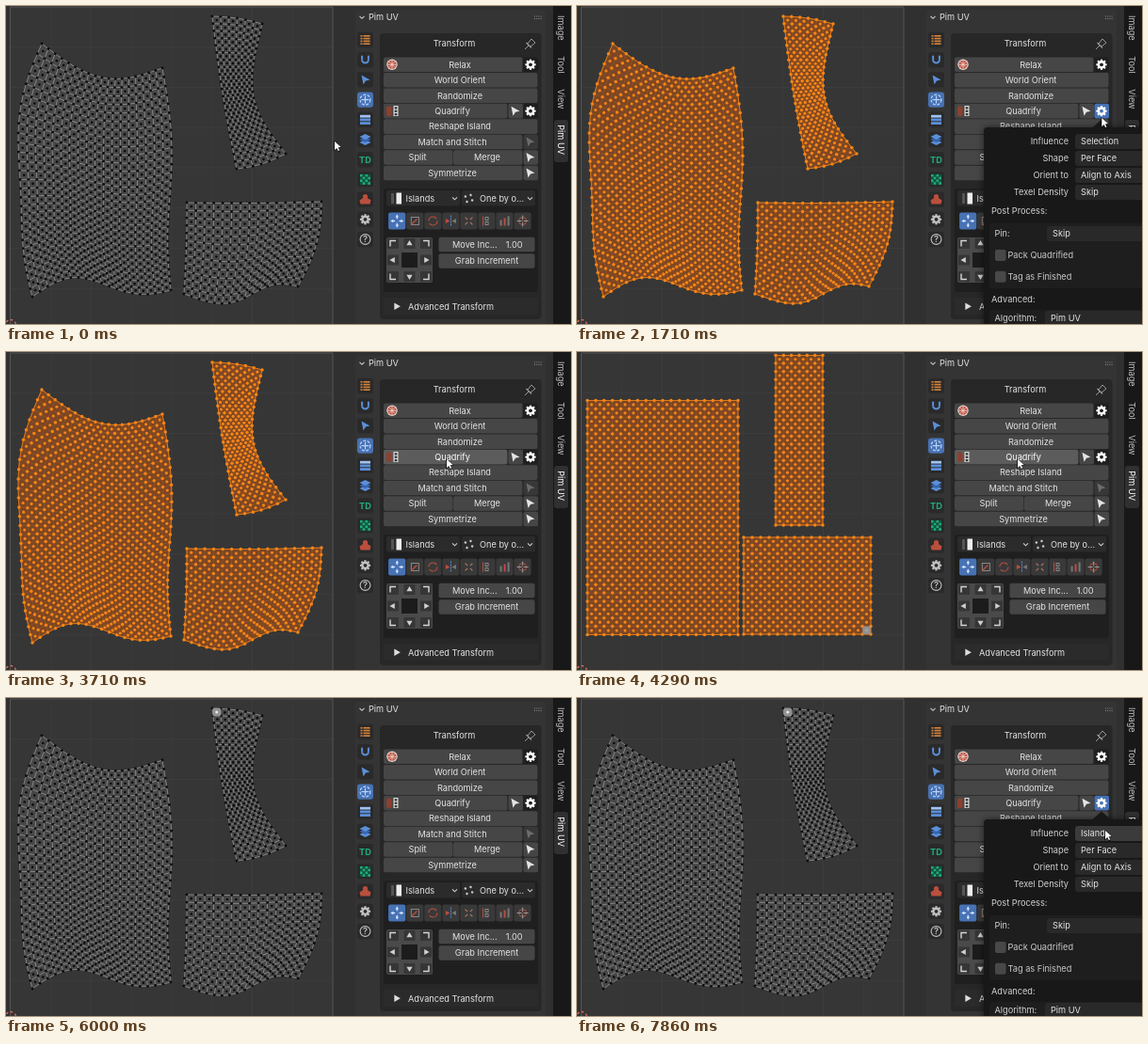
Recreate the animation shown at these times as an HTML page with a canvas. Size 600x338 px, loop 8 s.

```html
<!DOCTYPE html>
<html lang="en">
<head>
<meta charset="utf-8">
<title>UV transform panel</title>
<style>
html, body { margin: 0; width: 100%; height: 100%; overflow: hidden; background: #303030; }
canvas { display: block; width: 600px; height: 338px; }
</style>
</head>
<body>
<canvas id="stage" width="600" height="338"></canvas>
<script>
const ctx = document.getElementById('stage').getContext('2d');
const LOOP = 8000, STEP = 1000 / 7;
const NAME = 'Pim UV';
const BLUE = '#4772b3', ICON_BLUE = '#5b8fd9', TEXT = '#e4e4e4', LABEL = '#d2d2d2';
const ORANGE = '#d9853b', GREEN = '#1fae7c', RED = '#bb4f3e', GREY = '#c0c0c0', DARK = '#1f1f1f';

// ---------- drawing helpers ----------
const times = (n, fn) => Array.from({ length: n }, (_, i) => fn(i));

function box(x, y, w, h, color, radius = 2) {
  ctx.fillStyle = color;
  ctx.beginPath();
  ctx.roundRect(x, y, w, h, radius);
  ctx.fill();
}

function trace(points, closed) {
  ctx.beginPath();
  points.forEach(([x, y]) => ctx.lineTo(x, y));
  if (closed) ctx.closePath();
}

function poly(points, color) {
  trace(points, true);
  ctx.fillStyle = color;
  ctx.fill();
}

function line(points, color, width = 1) {
  trace(points);
  ctx.strokeStyle = color;
  ctx.lineWidth = width;
  ctx.stroke();
}

function disc(x, y, r, color) {
  ctx.fillStyle = color;
  ctx.beginPath();
  ctx.arc(x, y, r, 0, 7);
  ctx.fill();
}

function ring(x, y, r, color, width = 1, sweep = Math.PI * 2) {
  ctx.strokeStyle = color;
  ctx.lineWidth = width;
  ctx.beginPath();
  ctx.arc(x, y, r, 0, sweep);
  ctx.stroke();
}

function frame(x, y, size, color) {
  ctx.strokeStyle = color;
  ctx.lineWidth = 1;
  ctx.strokeRect(x - size / 2, y - size / 2, size, size);
}

function dashed(draw, ...dash) {
  ctx.setLineDash(dash);
  draw();
  ctx.setLineDash([]);
}

function text(str, x, y, align = 'left', color = TEXT, weight = 400) {
  ctx.font = `${weight} 9.2px Inter, sans-serif`;
  ctx.textAlign = align;
  ctx.fillStyle = color;
  ctx.fillText(str, x, y + 3.3);
}

// Lines radiating from a centre.
function spokes(x, y, count, inner, outer, color, width = 1, turn = 0) {
  times(count, i => {
    const a = turn + i * 2 * Math.PI / count, c = Math.cos(a), s = Math.sin(a);
    line([[x + c * inner, y + s * inner], [x + c * outer, y + s * outer]], color, width);
  });
}

function triangle(x, y, r, angle, color) {
  poly(times(3, i => {
    const a = angle + i * 2 * Math.PI / 3;
    return [x + Math.cos(a) * r, y + Math.sin(a) * r];
  }), color);
}

function mouse(x, y, color, s = 1) {
  poly([[0, 0], [7, 6.4], [3.8, 6.7], [5.4, 10], [4, 10.6], [2.4, 7.4], [0, 9.6]]
    .map(([px, py]) => [x + px * s, y + py * s]), color);
}

function pointer(x, y, color) {
  poly([[x - 4, y - 5], [x + 5, y], [x + 0.5, y + 1], [x - 2, y + 5]], color);
}

function gear(x, y, color, hole) {
  spokes(x, y, 8, 3, 5.6, color, 2.2);
  disc(x, y, 4.3, color);
  disc(x, y, 1.9, hole);
}

function chevron(x, y) {
  line([[x - 2.5, y - 1.2], [x, y + 1.3], [x + 2.5, y - 1.2]], '#d0d0d0', 1.1);
}

// ---------- UV islands ----------
// Corners run top-left, top-right, bottom-left, bottom-right;
// each side bends by a sum of sines with the listed amplitudes.
const islands = [
  { cols: 18, rows: 28, rect: [11, 51.5, 160, 249], sag: 10,
    corners: [[38, 40], [166, 66], [28, 309], [175, 302]],
    top: [23], bottom: [-11, -10], left: [-21, -4, -3], right: [4, 4] },
  { cols: 6, rows: 21, rect: [211, 3.5, 50, 180.5], sag: 0,
    corners: [[219, 11], [272, 19], [245, 173], [297, 157]],
    top: [-2], bottom: [3], left: [-2], right: [-23, 2] },
  { cols: 15, rows: 12, rect: [177, 197, 135, 103], sag: 0,
    corners: [[192, 209], [335, 208], [189, 306], [310, 298]],
    top: [1], bottom: [8, 7, -2], left: [1], right: [7] }
];

const mix = (a, b, t) => a + (b - a) * t;
const wave = (amps, t) => amps.reduce((sum, a, n) => sum + a * Math.sin((n + 1) * Math.PI * t), 0);

function warped({ corners: [tl, tr, bl, br], top, bottom, left, right, sag }, u, v) {
  const [x, y] = [0, 1].map(k => mix(mix(tl[k], tr[k], u), mix(bl[k], br[k], u), v));
  return [
    x + mix(wave(left, v), wave(right, v), u),
    y + mix(wave(top, u), wave(bottom, u), v) + wave([sag], v)
  ];
}

function straight({ rect: [x, y, w, h] }, u, v) {
  return [x + u * w, y + v * h];
}

function drawIsland(island, place, selected, activeCell) {
  const { cols, rows } = island;
  const at = (i, j) => place(island, i / cols, j / rows);
  const mesh = times(rows + 1, j => times(cols + 1, i => at(i, j)));
  const columns = times(cols + 1, i => mesh.map(row => row[i]));
  const outline = [...mesh[0], ...columns[cols], ...mesh[rows].toReversed(), ...columns[0].toReversed()];
  poly(outline, selected ? '#7c4624' : '#474747');
  for (const path of [...mesh, ...columns]) line(path, selected ? '#8f5122' : '#8e8e8e', 0.9);
  if (selected) line(outline, '#e87d16', 0.9);

  const [color, r] = selected ? ['#f58518', 1.75] : ['#0c0c0c', 1.45];
  mesh.flat().forEach(([x, y]) => disc(x, y, r, color));
  times(rows, j => times(cols, i => disc(...at(i + 0.5, j + 0.5), r * 0.9, color)));
  if (activeCell) {
    const [x, y] = at(activeCell[0] + 0.5, activeCell[1] + 0.5);
    box(x - 4.2, y - 4.2, 8.4, 8.4, '#929292', 1);
    disc(x, y, 1.5, selected ? '#b5a08c' : '#e8e8e8');
  }
}

function drawEditor(state) {
  box(0, 0, 600, 338, '#303030', 0);
  box(5, 1, 342, 337, '#363636', 0);
  for (let p = 42.75; p < 340; p += 42.75) {
    line([[5 + p, 1], [5 + p, 338]], '#3e3e3e', 0.8);
    line([[5, 1 + p], [347, 1 + p]], '#3e3e3e', 0.8);
  }
  line([[4.5, 338], [4.5, 1], [347, 1], [347, 338]], '#555');
  islands.forEach((island, n) => {
    let cell = null;
    if (state.quad && n === 2) cell = [island.cols - 1, island.rows - 1];
    if (state.second && n === 1) cell = [0, 0];
    drawIsland(island, state.quad ? straight : warped, state.selected, cell);
  });
  dashed(() => ring(5, 339, 5.5, '#e07060', 1.3), 2.5, 2.5);
}

// ---------- sidebar ----------
function button(x, cy, w, label, state, labelX = x + w / 2) {
  const [mx, my] = state.cursor || [-1, -1];
  const hover = !state.popover && mx >= x && mx < x + w && Math.abs(my - cy) < 8;
  box(x, cy - 7.8, w, 15.6, hover && state.pressed ? BLUE : hover ? '#5c5c5c' : '#464646');
  text(label, labelX, cy, 'center', hover ? '#fff' : TEXT);
}

function drawTabs() {
  box(581, 0, 19, 338, '#181818', 0);
  box(582, 121, 15, 45, '#303030', 3);
  ctx.save();
  ctx.translate(589, 10);
  ctx.rotate(Math.PI / 2);
  let offset = 0;
  for (const label of ['Image', 'Tool', 'View', NAME]) {
    text(label, offset, 0, 'left', label === NAME ? '#fff' : GREY);
    offset += ctx.measureText(label).width + 16.6;
  }
  ctx.restore();
}

const categoryIcons = [
  (x, y) => times(4, i => {
    box(x - 5, y - 5 + i * 2.8, 2, 1.6, ORANGE, 0);
    box(x - 2, y - 5 + i * 2.8, 7, 1.6, ORANGE, 0);
  }),
  (x, y) => {
    ring(x, y, 3.4, ICON_BLUE, 2, Math.PI);
    for (const side of [-3.4, 3.4]) line([[x + side, y - 4.5], [x + side, y]], ICON_BLUE, 2);
  },
  (x, y) => pointer(x, y, ICON_BLUE),
  (x, y) => {
    dashed(() => ring(x, y, 5.4, '#b9d4ff', 1.2), 3, 1.5);
    spokes(x, y, 4, 0, 4, '#b9d4ff', 1.2);
  },
  (x, y) => times(3, i => box(x - 5.5, y - 5 + i * 3.7, 11, 2.8, i ? ICON_BLUE : '#9ec2f5', 0)),
  (x, y) => times(3, i => {
    const cy = y + 3 - i * 3;
    poly([[x, cy - 3], [x + 6, cy], [x, cy + 3], [x - 6, cy]], i === 1 ? '#3565ae' : ICON_BLUE);
  }),
  (x, y) => text('TD', x, y, 'center', GREEN, 700),
  (x, y) => times(16, i => {
    const col = i % 4, row = i >> 2;
    box(x - 5.5 + col * 2.75, y - 5.5 + row * 2.75, 2.75, 2.75, (col + row) % 2 ? '#0c5943' : GREEN, 0);
  }),
  (x, y) => {
    disc(x, y - 3, 2.6, RED);
    poly([[x, y - 3], [x + 6, y + 1], [x + 5, y + 5], [x - 5, y + 5], [x - 6, y + 1]], RED);
  },
  (x, y) => gear(x, y, GREY, '#2a2a2a'),
  (x, y) => {
    ring(x, y, 5.4, GREY, 1.1);
    text('?', x, y, 'center', GREY, 600);
  }
];

function drawCategories() {
  categoryIcons.forEach((icon, i) => {
    const y = 36 + i * 21.2;
    box(373, y - 8.2, 17, 16.4, i === 3 ? BLUE : '#2a2a2a', 3);
    icon(381.5, y);
  });
}

const toolIcons = [
  (x, y) => {
    spokes(x, y, 4, 2.2, 6, '#d8e6ff', 1.2);
    times(4, i => triangle(x + 5 * Math.cos(i * Math.PI / 2), y + 5 * Math.sin(i * Math.PI / 2), 2, i * Math.PI / 2, '#d8e6ff'));
  },
  (x, y) => { frame(x, y, 8, '#888'); line([[x - 4, y + 4], [x + 2, y - 2]], RED, 1.3); },
  (x, y) => dashed(() => ring(x, y, 4.5, RED, 1.2), 11, 3),
  (x, y) => {
    dashed(() => line([[x, y - 6], [x, y + 6]], ICON_BLUE), 2, 1);
    triangle(x - 4, y, 3, 0, RED);
    triangle(x + 4, y, 3, Math.PI, '#777');
  },
  (x, y) => spokes(x, y, 4, 2, 5.5, '#b07a6c', 1.2, Math.PI / 4),
  (x, y) => {
    line([[x - 4, y - 5], [x - 4, y + 5]], RED);
    for (const dy of [-2.5, 2.5]) frame(x, y + dy, 3, '#888');
  },
  (x, y) => times(3, i => box(x - 5 + i * 4, y - 1 - i * 2, 2, 6 + i * 2, i === 1 ? RED : '#777', 0)),
  (x, y) => { ring(x, y, 4, RED); spokes(x, y, 4, 1, 6, '#999'); }
];

function drawAnchorGrid() {
  box(404, 246, 49, 48, '#4a4a4a');
  box(420, 262, 17, 16, '#1c1c1c', 0);
  for (const a of [-1, 0, 1]) for (const b of [-1, 0, 1]) {
    if (!a && !b) continue;
    const x = 428.5 + a * 17.5, y = 270 + b * 17.5;
    box(x - 6, y - 5.5, 12, 11, '#363636', 1);
    if (a && b) line([[x - a * 3, y + b * 3], [x + a * 3, y + b * 3], [x + a * 3, y - b * 3]], '#d5d5d5', 1.4);
    else triangle(x, y, 3.6, Math.atan2(b, a), '#cfcfcf');
  }
}

function drawTransformBox(state) {
  box(401, 194, 164, 110, DARK, 3);
  for (const x of [404, 484]) {
    box(x, 196, 78, 16.5, '#2b2b2b');
    chevron(x + 72.5, 204.5);
  }
  box(409, 199, 3, 11, '#555', 0);
  box(414.5, 198.5, 5.5, 12, '#eee', 0);
  text('Islands', 424.5, 204.5);
  spokes(491.5, 204.5, 4, 3, 5.2, '#ccc', 2.2, 0.5);
  text('One by o...', 503, 204.5);
  toolIcons.forEach((icon, i) => {
    const x = 415.3 + i * 19.05;
    box(x - 9.2, 219.5, 18.2, 18, i ? '#393939' : BLUE);
    icon(x, 228.5);
  });
  drawAnchorGrid();
  button(459.5, 253.5, 102, '', state);
  text('Move Inc...', 474, 253.5);
  text('1.00', 548.5, 253.5, 'right');
  button(459.5, 271, 102, 'Grab Increment', state);
}

const operators = [
  { labels: ['Relax'], icon: true, gear: true },
  { labels: ['World Orient'] },
  { labels: ['Randomize'] },
  { labels: ['Quadrify'], icon: true, pointer: true, gear: true, popover: true },
  { labels: ['Reshape Island'] },
  { labels: ['Match and Stitch'], pointer: true, disabled: true },
  { labels: ['Split', 'Merge'], pointer: true },
  { labels: ['Symmetrize'], pointer: true }
];

function drawOperator(op, y, state) {
  let right = 565;
  if (op.gear) {
    const back = op.popover && state.popover ? BLUE : DARK;
    right -= 16;
    box(right + 0.5, y - 7.8, 15.5, 15.6, back);
    gear(right + 8, y, '#fff', back);
  }
  if (op.pointer) {
    right -= 16;
    box(right + 0.5, y - 7.8, 15.5, 15.6, op.disabled ? '#383838' : '#464646');
    pointer(right + 7.5, y, op.disabled ? '#6c6c6c' : '#e4e4e4');
  }
  const w = (right - 401) / op.labels.length;
  op.labels.forEach((label, i) => {
    const x = 401 + i * w;
    button(x, y, w - 0.6, label, state, x + w / 2 + (op.icon ? 7 : -1));
  });
}

function drawPanel(state) {
  box(368, 0, 213, 338, '#303030', 0);
  box(371, 4, 202, 340, '#343434', 4);
  chevron(378, 12);
  text(NAME, 385, 12);
  times(8, i => box(561 + (i % 4) * 2.2, 10.5 + (i >> 2) * 2.5, 1, 1, '#888', 0));
  drawCategories();
  box(397, 29, 171.5, 304, '#272727', 4);
  text('Transform', 476, 40, 'center');
  line([[551, 46], [555, 42]], '#999');
  line([[552.5, 39], [558, 44.5]], '#999', 1.2);
  line([[554, 40], [558, 35], [562, 39], [557, 43]], '#999');

  operators.forEach((op, i) => drawOperator(op, 62.3 + i * 16.45, state));
  disc(410, 62.3, 5.7, '#e8d5d0');
  disc(410, 62.3, 4.6, RED);
  spokes(410, 62.3, 8, 0, 4.6, '#f0dcd6', 0.8);
  box(404, 106.5, 5.5, 10.5, '#8d4030');
  box(411.5, 106, 5, 11, '#ddd', 0);
  times(3, i => box(412.7, 107.2 + i * 3.4, 2.6, 2.3, '#333', 0));

  drawTransformBox(state);
  box(401, 310, 164, 18, '#2b2b2b');
  triangle(414.5, 319.3, 4.4, 0, '#ddd');
  text('Advanced Transform', 427, 319.3);
}

function field(label, value, labelX, x, y, align, color = '#292929') {
  text(label, labelX, y, align, LABEL);
  box(x, y - 8, 120, 16, color, 3);
  text(value, x + 6, y);
}

function drawPopover(state) {
  const [mx, my] = state.cursor;
  ctx.save();
  ctx.shadowColor = 'rgba(0,0,0,.55)';
  ctx.shadowBlur = 7;
  box(432, 129, 180, 220, '#181818', 4);
  ctx.restore();
  poly([[547, 129.5], [557, 120.5], [567, 129.5]], '#181818');
  const settings = { Influence: state.influence, Shape: 'Per Face', 'Orient to': 'Align to Axis', 'Texel Density': 'Skip' };
  Object.entries(settings).forEach(([label, value], i) => {
    const y = 144 + i * 18, hover = mx > 529 && Math.abs(my - y) < 8;
    field(label, value, 522, 529, y, 'right', state.menu && !i ? BLUE : hover ? '#3b3b3b' : '#292929');
  });
  text('Post Process:', 440, 218, 'left', LABEL);
  box(438, 231, 170, 69, '#1e1e1e', 3);
  field('Pin:', 'Skip', 443.5, 499, 242);
  ['Pack Quadrified', 'Tag as Finished'].forEach((label, i) => {
    const y = 265 + i * 22.7;
    box(444, y - 6, 11.5, 12, '#484848');
    text(label, 457.5, y, 'left', '#c8c8c8');
  });
  text('Advanced:', 440, 312, 'left', LABEL);
  box(438, 323, 170, 30, '#1e1e1e', 3);
  field('Algorithm:', NAME, 443.5, 497, 332);

  if (!state.menu) return;
  box(531, 153, 80, 36.5, '#181818');
  ['Island', 'Selection'].forEach((label, i) => {
    const y = 162 + i * 18.5, hover = Math.abs(my - y) < 9;
    box(531, y - 8.3, 80, 17, i ? BLUE : hover ? '#3b3b3b' : '#202020');
    text(label, 537.5, y);
    line([[537.5, y + 5], [542, y + 5]], TEXT, 0.7);
  });
}

// ---------- timeline, in steps of 1/7 s ----------
const SECOND_TAKE = 42;
const cursorKeys = [
  [1, 349, 144], [8, 544, 130], [11, 556, 111], [14, 561, 142], [19, 553, 160], [21, 553, 160],
  [24, 294, 146], [26, 468, 114], [42, 468, 114], [43, 590, 200], [47, 556, 111], [55, 561, 141]
];

function cursorAt(k) {
  if (k === SECOND_TAKE) return null;
  const n = cursorKeys.findIndex(key => key[0] >= k);
  const [k1, x1, y1] = cursorKeys[n];
  if (n === 0) return [x1, y1];
  const [k0, x0, y0] = cursorKeys[n - 1];
  const f = (k - k0) / (k1 - k0), eased = f * f * (3 - 2 * f);
  return [mix(x0, x1, eased), mix(y0, y1, eased)];
}

function draw(k) {
  const during = (from, to) => k >= from && k < to;
  const state = {
    cursor: cursorAt(k),
    selected: during(3, SECOND_TAKE),
    quad: during(30, SECOND_TAKE),
    second: k >= SECOND_TAKE,
    pressed: during(28, 30),
    popover: during(11, 23) || k >= 48,
    menu: during(14, 21),
    influence: k < 21 ? 'Selection' : 'Island'
  };
  drawEditor(state);
  drawPanel(state);
  drawTabs();
  if (state.popover) drawPopover(state);
  if (state.cursor) {
    const [x, y] = state.cursor;
    mouse(x - 0.8, y - 1.2, '#111', 1.2);
    mouse(x, y, '#fff', 0.95);
  }
}

let shown = -1;
function tick() {
  const k = Math.floor((performance.now() % LOOP) / STEP + 0.03) % 56;
  if (k !== shown) draw(shown = k);
  requestAnimationFrame(tick);
}
tick();
</script>
</body>
</html>
```
